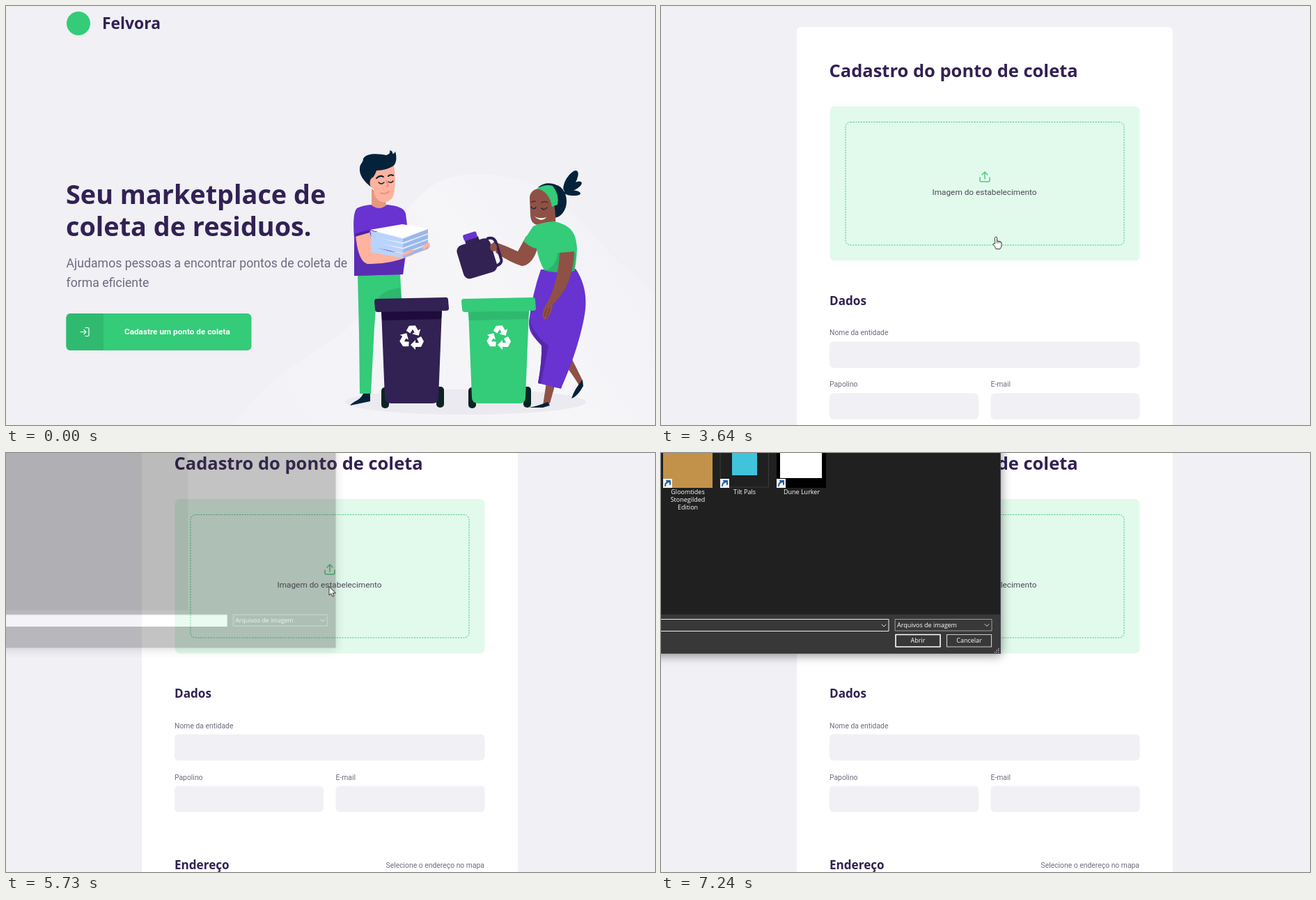
These frames come from a looping animation (932 by 601 pixels, 7990 ms). An HTML page with a canvas:

```html
<!DOCTYPE html>
<html lang="pt">
<head>
<meta charset="utf-8">
<title>Pontos de coleta</title>
<style>
html, body { margin: 0; width: 100%; height: 100%; overflow: hidden; background: #f0f0f5; }
canvas { display: block; }
</style>
</head>
<body>
<canvas id="stage" width="932" height="601"></canvas>
<script>
const LOOP = 7990, W = 932, H = 601;
const TITLE = '"Noto Sans", sans-serif', BODY = 'Roboto, sans-serif', SYSTEM = '"Open Sans", sans-serif';
const INK = '#322153', GREEN = '#34cb79', GREY = '#6c6c80', PAGE = '#f0f0f5';
const PURPLE = '#6833d0', NAVY = '#04223a', SKIN = '#ffb29d', BROWN = '#8f5146';
const stage = document.getElementById('stage').getContext('2d');
const layer = new OffscreenCanvas(W, H).getContext('2d');
let c = stage;

// ---- drawing helpers
function fill(color, d) { c.fillStyle = color; c.fill(new Path2D(d)); }
function line(color, width, d) {
  c.strokeStyle = color; c.lineWidth = width;
  c.lineCap = c.lineJoin = 'round';
  c.stroke(new Path2D(d));
}
function box(color, x, y, w, h, r = 0) {
  c.fillStyle = color; c.beginPath(); c.roundRect(x, y, w, h, r); c.fill();
}
function frame(color, x, y, w, h, width = 1) {
  c.strokeStyle = color; c.lineWidth = width; c.strokeRect(x, y, w, h);
}
function oval(color, x, y, rx, ry = rx, turn = 0) {
  c.fillStyle = color; c.beginPath(); c.ellipse(x, y, rx, ry, turn, 0, 7); c.fill();
}
function text(str, x, y, font, color, align = 'left') {
  c.font = font; c.fillStyle = color; c.textAlign = align; c.fillText(str, x, y);
}
function at(x, y, turn, draw) {
  c.save(); c.translate(x, y); c.rotate(turn); draw(); c.restore();
}

// ---- timing
// keys are [time, ...values]; values run straight between keys
function track(keys, t) {
  if (t <= keys[0][0]) return keys[0].slice(1);
  for (let i = 1; i < keys.length; i++) {
    const a = keys[i - 1], b = keys[i];
    if (t < b[0]) {
      const p = (t - a[0]) / (b[0] - a[0]);
      return a.slice(1).map((v, j) => v + (b[j + 1] - v) * p);
    }
  }
  return keys[keys.length - 1].slice(1);
}
function snap(t) {
  const k = Math.floor((t - 134) / 94.6);
  return k < 0 ? 0 : 160 + k * 94.6;
}
const POINTER = [
  [160, 723, 557], [255, 620, 505], [349, 519, 475], [538, 519, 475],
  [800, 430, 479], [1010, 328, 470], [1106, 317, 468], [1768, 317, 468],
  [2052, 368, 452], [2620, 368, 452], [2714, 418, 440], [2809, 430, 441],
  [2904, 430, 441], [3377, 481, 331], [4795, 481, 331], [5363, 458, 174],
  [5552, 464, 192], [6214, 464, 192], [6404, 433, 204], [6688, 433, 204], [7161, 376, 16]
];
const SCROLL = [
  [3471, 0], [3566, 50], [3660, 70], [3755, 74], [3849, 140], [3944, 196],
  [4039, 222], [4133, 222], [4228, 192], [4322, 160], [4417, 148]
];
const FADE = [[5552, 0], [5647, .1], [5741, .3], [5836, .58], [5930, .83], [6025, .96], [6120, 1]];

// ---- header
function brand(x) {
  oval(GREEN, x + 18, 25, 17);
  text('Felvora', x + 52, 33, 'bold 22.9px ' + TITLE, INK);
}

// ---- home page
function recycle(x, y) {
  for (let i = 0; i < 3; i++) at(x, y, i * Math.PI * 2 / 3, () =>
    fill('#fff', 'M7,1 L13,-2 L17,5 L13,13 L5,13 L5,17 L-2,10 L5,3 L5,7 L10,7Z'));
}
function bin(x, body, shade, lid) {
  at(x, 0, 0, () => {
    box('#0b2423', 10, 547, 11, 30, 5);
    box('#0b2423', 89, 546, 11, 30, 5);
    fill(body, 'M10,436 L97,436 L92,562 Q92,569 84,570 L24,570 Q15,569 15,562Z');
    fill(shade, 'M10,438 L97,438 L96,449 L11,451Z');
    fill(lid, 'M3,420 L103,418 Q106,418 106,422 L107,434 Q107,437 103,437 L5,439 Q1,439 1,435 L0,424 Q0,420 3,420Z');
    recycle(54, 476);
  });
}
function man() {
  fill(GREEN, 'M505,384 L566,384 L568,421 L532,421 L529,460 L524,556 L508,556 L507,470Z');
  fill('#2fb76e', 'M534,421 Q538,409 566,404 L568,421Z');
  fill(NAVY, 'M513,556 L523,556 L523,567 L494,573 C498,567 509,566 513,556Z');
  fill('#e79782', 'M525,262 L525,288 Q537,296 546,287 L545,276Z');
  fill(PURPLE, 'M504,290 Q512,286 524,285 Q536,295 547,285 C562,287 572,289 574,298 L578,330 L570,385 L500,387 L500,332 Q497,297 504,290Z');
  fill('#5a2cb2', 'M503,333 L574,345 L570,385 L500,387 L500,345Z');
  fill(NAVY, 'M525,260 C514,252 507,242 508,233 C508,226 513,225 513,219 C518,210 536,212 546,214 Q553,212 551,207 Q556,208 555,212 Q559,211 559,208 C562,219 560,226 556,230 Q545,236 534,238 L529,257Z');
  fill(SKIN, 'M527,246 Q531,240 532,236 Q546,236 557,229 C560,247 559,267 555,275 C547,285 533,283 529,270 L528,262 C521,261 521,247 527,246Z');
  line(NAVY, 1.3, 'M535,253 Q539,257 543,253 M549,252 Q553,255 556,251');
  line(NAVY, 2, 'M532,247 Q537,242 542,245 M549,244 Q552,241 556,243');
  line('#d9816f', 1.2, 'M546,250 L549,258 L546,259 M538,268 Q545,271 550,266');
  oval(SKIN, 603, 344, 6, 5);
  fill(SKIN, 'M502,327 L522,322 L526,346 Q548,356 574,351 L588,350 Q588,357 579,359 Q550,371 519,370 Q505,366 502,327Z');
  fill('#4d249b', 'M500,327 L522,321 L522,325 L501,331Z');
  for (let i = 3; i >= 0; i--) {
    const y = i * 7.5;
    at(0, y, 0, () => {
      fill('#b9d3fb', 'M523,322 L570,334 L570,339 L525,331Z');
      fill('#9bb7e8', 'M570,334 L606,320 L606,326 L570,339Z');
      fill('#fff', 'M523,321 L569,313 L607,319 L570,333Z');
    });
    if (i) at(0, y, 0, () => fill('#d6e5fd', 'M523,321 L570,333 L607,319 L600,315 L540,313Z'));
  }
  line(SKIN, 4, 'M572,356 L583,351 M600,347 L606,341');
}
function jug() {
  at(677, 361, -.3, () => {
    line(INK, 4, 'M22,-22 Q32,-22 32,-12 L32,12 Q32,18 24,19');
    box(INK, -26, -24, 50, 50, 9);
    box(INK, -10, -29, 20, 8);
    box(PURPLE, -11, -37, 20, 9, 2);
    line('#fff', 3, 'M26,-16 L26,13');
  });
}
function woman() {
  fill(BROWN, 'M801,512 L811,503 L828,537 L824,546 Q818,535 801,512Z M776,540 L788,545 L781,570 L771,573Z');
  fill(NAVY, 'M812,563 Q817,548 828,536 L829,545 Q821,560 812,563Z M751,576 Q766,573 778,568 L781,573 L771,576Z');
  fill(PURPLE, 'M768,378 L818,377 C831,396 836,420 830,448 C822,490 806,528 797,549 L764,541 Q770,508 769,487 C756,473 750,467 751,452 Q756,412 768,378Z');
  fill('#5528ab', 'M752,452 Q762,476 779,487 L768,542 L764,541 Q770,508 769,487 Q754,472 752,452Z');
  fill(BROWN, 'M747,330 L764,345 Q757,371 741,373 Q724,368 702,353 L695,344 L701,338 Q718,344 735,352Z');
  oval(NAVY, 786, 280, 19, 24);
  oval(NAVY, 811, 251, 7, 17, .55);
  oval(NAVY, 815, 259, 5, 13, 1.1);
  oval(NAVY, 813, 268, 4, 12, 1.65);
  fill(BROWN, 'M752,274 C754,259 775,258 782,272 Q790,285 789,312 L773,318 L773,313 Q754,318 753,300Z');
  fill(NAVY, 'M764,260 Q775,251 789,256 L794,282 Q780,263 764,260Z');
  fill(GREEN, 'M762,262 Q774,255 785,258 Q795,270 792,285 L784,288 Q780,265 762,262Z');
  line(NAVY, 1.2, 'M754,288 Q757,293 761,289 M769,290 Q773,294 777,289');
  line('#532920', 1.5, 'M754,281 L760,280 M769,282 Q774,279 778,282');
  fill('#fff', 'M759,302 Q767,306 776,303 Q769,311 759,302Z');
  fill(GREEN, 'M757,316 C768,311 780,309 788,309 C807,314 819,321 820,348 Q819,371 816,380 Q790,384 773,379 Q765,365 762,348 Q752,346 743,337Z');
  fill('#2db36a', 'M792,354 L818,354 L816,380 Q790,384 774,379 Q790,375 792,354Z');
  fill(BROWN, 'M795,354 L816,352 C815,386 804,411 785,428 Q784,443 775,450 Q768,449 772,434 L779,422 Q793,394 795,354Z');
  line('#72382f', 1, 'M777,433 L773,445 M781,433 L777,446');
}
function home(hover) {
  const sheen = c.createLinearGradient(420, 580, 880, 260);
  sheen.addColorStop(0, '#f3f3f7'); sheen.addColorStop(.6, '#f6f6f9'); sheen.addColorStop(1, '#f1f1f6');
  fill(sheen, 'M328,601 C382,516 470,490 507,445 C550,390 548,241 676,241 C790,241 820,310 880,368 Q910,390 932,416 L932,601Z');
  oval('#eaeaf0', 660, 568, 173, 18);
  brand(86);
  text('Seu marketplace de', 86, 283.5, 'bold 37.8px ' + TITLE, INK);
  text('coleta de residuos.', 86, 329.5, 'bold 37.8px ' + TITLE, INK);
  text('Ajudamos pessoas a encontrar pontos de coleta de', 86.5, 374.8, '17.7px ' + BODY, GREY);
  text('forma eficiente', 86.5, 402.8, '17.7px ' + BODY, GREY);
  box(hover ? '#2fb86e' : GREEN, 86.5, 441, 266, 53, 6);
  box(hover ? '#2ba864' : '#30ba6f', 86.5, 441, 53.5, 53, [6, 0, 0, 6]);
  line('#fff', 1.2, 'M114,461.5 H117.5 Q119,461.5 119,463 V472 Q119,473.5 117.5,473.5 H114 M107,467.5 H115 M112,464.5 L115,467.5 L112,470.5');
  text('Cadastre um ponto de coleta', 170, 471.3, 'bold 11.76px ' + BODY, '#fff');
  man();
  woman();
  jug();
  oval(BROWN, 700, 346, 5, 6);
  bin(529, INK, '#1f0c3c', INK);
  bin(654, GREEN, '#2fb970', GREEN);
}

// ---- form page
function field(name, x, y, w) {
  text(name, x, y, '10.36px ' + BODY, GREY);
  box(PAGE, x, y + 9, w, 37.5, 6);
}
function map() {
  c.save();
  c.beginPath(); c.roundRect(242, 778.5, 445, 300, 7); c.clip();
  box('#e7e3e0', 242, 778, 445, 300);
  box('#cfe8c4', 425, 785, 18, 12); box('#d5e8cb', 590, 810, 40, 30); box('#d9d0c9', 395, 784, 22, 10);
  for (let i = 0; i < 9; i++) {
    const x = 265 + i * 51;
    line('#fff', 5, `M${x},776 L${x + (i % 3 - 1) * 26},850 M${x - 30},${806 + i % 4 * 5} L${x + 28},${795 + i % 3 * 8}`);
  }
  line('#f7f0b8', 8, 'M252,806 Q290,780 350,785 M661,850 L681,776');
  line('#fff', 7, 'M335,776 L375,806 L420,850');
  line('#e892a2', 10, 'M552,776 Q535,806 533,850');
  line('#fcd6a4', 9, 'M520,776 L490,850 M600,776 L625,806 L605,850');
  const name = (str, x, y, turn) => at(x, y, turn, () => text(str, 0, 0, '9px ' + SYSTEM, '#443f3c'));
  name('Rua Cerro', 274, 793, -.2);
  name('nida Prado', 337, 784, .7);
  name('Av', 468, 786, 1.2);
  name('Rua', 668, 796, -1.3);
  box('#aaa', 250, 786, 24, 48, 3);
  box('#fff', 252, 787.5, 21, 45, 2);
  text('+', 262, 803, 'bold 15px ' + SYSTEM, '#000', 'center');
  c.restore();
}
function form(scroll) {
  c.save();
  c.translate(0, -scroll);
  brand(58);
  line(GREEN, 1.3, 'M766,24.5 H759 M762,21.3 L758.8,24.5 L762,27.7');
  text('Voltar para home', 781, 29, '500 11.84px ' + BODY, INK);
  box('#fff', 195, 100, 540, 1100, 6);
  text('Cadastro do ponto de coleta', 241.5, 172, 'bold 25.5px ' + TITLE, INK);
  box('#e1faec', 242.5, 214, 445, 221.5, 7);
  c.strokeStyle = '#4ecb79'; c.lineWidth = 1; c.lineCap = 'butt'; c.setLineDash([2.2, 1.5]);
  c.beginPath(); c.roundRect(265, 236.5, 400, 176.5, 7); c.stroke();
  c.setLineDash([]);
  line('#4ecb79', 1.5, 'M458,316 V320 Q458,322 460,322 H470 Q472,322 472,320 V316 M465,318 V308.5 M461,312 L465,308 L469,312');
  text('Imagem do estabelecimento', 464.5, 340.8, '11.84px ' + BODY, '#4e4958', 'center');
  text('Dados', 242, 499, 'bold 17.1px ' + TITLE, INK);
  field('Nome da entidade', 242, 542.5, 445.5);
  field('Papolino', 242, 616.5, 214);
  field('E-mail', 473.5, 616.5, 214);
  text('Endereço', 242, 744.5, 'bold 17.1px ' + TITLE, INK);
  text('Selecione o endereço no mapa', 687, 742.5, '10.36px ' + BODY, GREY, 'right');
  map();
  c.restore();
}

// ---- file picker
function chevron(x, y) { line('#ddd', 1, `M${x - 3},${y - 1.5} L${x},${y + 1.5} L${x + 3},${y - 1.5}`); }
function shortcut(x) {
  box('#f4f4f4', x, 37, 13, 13);
  line('#1c5fb0', 2, `M${x + 3},47 Q${x + 3},42 ${x + 9},41 M${x + 5},40 H${x + 10} V45`);
}
function item(x, names) {
  names.forEach((n, i) => text(n, x, 59 + i * 11, '9px ' + SYSTEM, '#fff', 'center'));
}
function picker(alpha, loaded) {
  const ready = alpha > .9;
  c = layer;
  c.clearRect(0, 0, W, H);
  c.save();
  c.shadowColor = 'rgba(0,0,0,.45)'; c.shadowBlur = 14; c.shadowOffsetY = 2;
  box('#383838', -400, -300, 888, 588);
  c.restore();
  box('#202020', -400, -300, ready ? 887.5 : 669, 531.5);
  line(ready ? '#4c4c58' : '#7d74b4', 1, 'M487.5,-10 V287.5 H-10');
  if (ready) {
    frame('#eee', -20, 238.5, 347, 17);
    chevron(320, 247.5);
    frame('#fff', 337, 260.5, 64, 17.5, 1.6);
    frame('#ccc', 410.5, 260.5, 64, 17.5, 1.2);
    text('Abrir', 369, 272.3, '9px ' + SYSTEM, '#fff', 'center');
    text('Cancelar', 442.5, 272.3, '9px ' + SYSTEM, '#fff', 'center');
    for (let i = 0; i < 3; i++)
      for (let j = 0; j <= i; j++) box('#bbb', 484 - j * 2.6, 280 + i * 2.6, 1.4, 1.4);
  } else {
    box('#fff', -20, 238.5, 347, 17.5);
  }
  frame('#a0a0a0', 336.5, 238.5, 138.5, 16.5);
  text('Arquivos de imagem', 339, 250.3, '9px ' + SYSTEM, '#fff');
  chevron(468, 247);
  if (loaded) {
    box('#c2924a', 3, -20, 71, 70);
    frame('#3b3b3b', 85.5, -20, 69, 69);
    box('#3fc4dc', 102, -4, 36, 36);
    box('#000', 166, -20, 71, 70);
    box('#fff', 171, -24, 60, 60);
    [3, 85, 166].forEach(shortcut);
    item(38.5, ['Gloomtides', 'Stonegilded', 'Edition']);
    item(120, ['Tilt Pals']);
    item(202, ['Dune Lurker']);
  }
  c = stage;
  const k = 1 - .041 * (1 - alpha);
  c.save();
  c.globalAlpha = alpha;
  c.translate(0, 10); c.scale(k, k); c.translate(0, -10);
  c.drawImage(layer.canvas, 0, 0);
  c.restore();
}

// ---- pointer
function pointer(kind, x, y) {
  at(x, y, 0, () => {
    if (kind === 'beam') {
      line('#fff', 2.4, 'M3,-4 V6');
      line('#333', 1, 'M.5,-5 H2 L3,-4 L4,-5 H5.5 M3,-4 V6 M.5,7 H2 L3,6 L4,7 H5.5');
      return;
    }
    const d = kind === 'hand'
      ? 'M-1.5,1 Q0,-1 1.5,1 V6 L6.5,7 Q8,7.5 8,9 V12 Q8,15 6,17.5 H0 Q-1,14 -4,11 Q-4.5,8.5 -1.5,10Z'
      : 'M0,0 V12 L3,9.5 L5,14 L7,13 L5.2,8.9 H9Z';
    fill('#fff', d);
    line('#222', .9, d);
    if (kind === 'hand') line('#222', .7, 'M1.5,6 V9 M3.7,6.5 V9 M5.9,7 V9');
  });
}

function draw(now) {
  const t = snap(now % LOOP);
  const onHome = t < 1850;
  const [x, y] = track(POINTER, t);
  const [scroll] = track(SCROLL, t);
  const [alpha] = track(FADE, t);
  const hover = onHome && x < 352;
  const overDrop = !onHome && !alpha && y > 214 - scroll && y < 435 - scroll;

  box(PAGE, 0, 0, W, H);
  if (onHome) home(hover); else form(scroll);
  if (alpha) picker(alpha, t >= 6290);
  if (t >= 1560 && t < 1750) oval('rgba(205,215,30,.75)', 317, 468, 9);
  if (t >= 160 && t < 7240) {
    const beam = t >= 3840 && t < 4600;
    pointer(beam ? 'beam' : hover || overDrop ? 'hand' : 'arrow', x, y);
  }
  requestAnimationFrame(draw);
}
requestAnimationFrame(draw);
</script>
</body>
</html>
```
